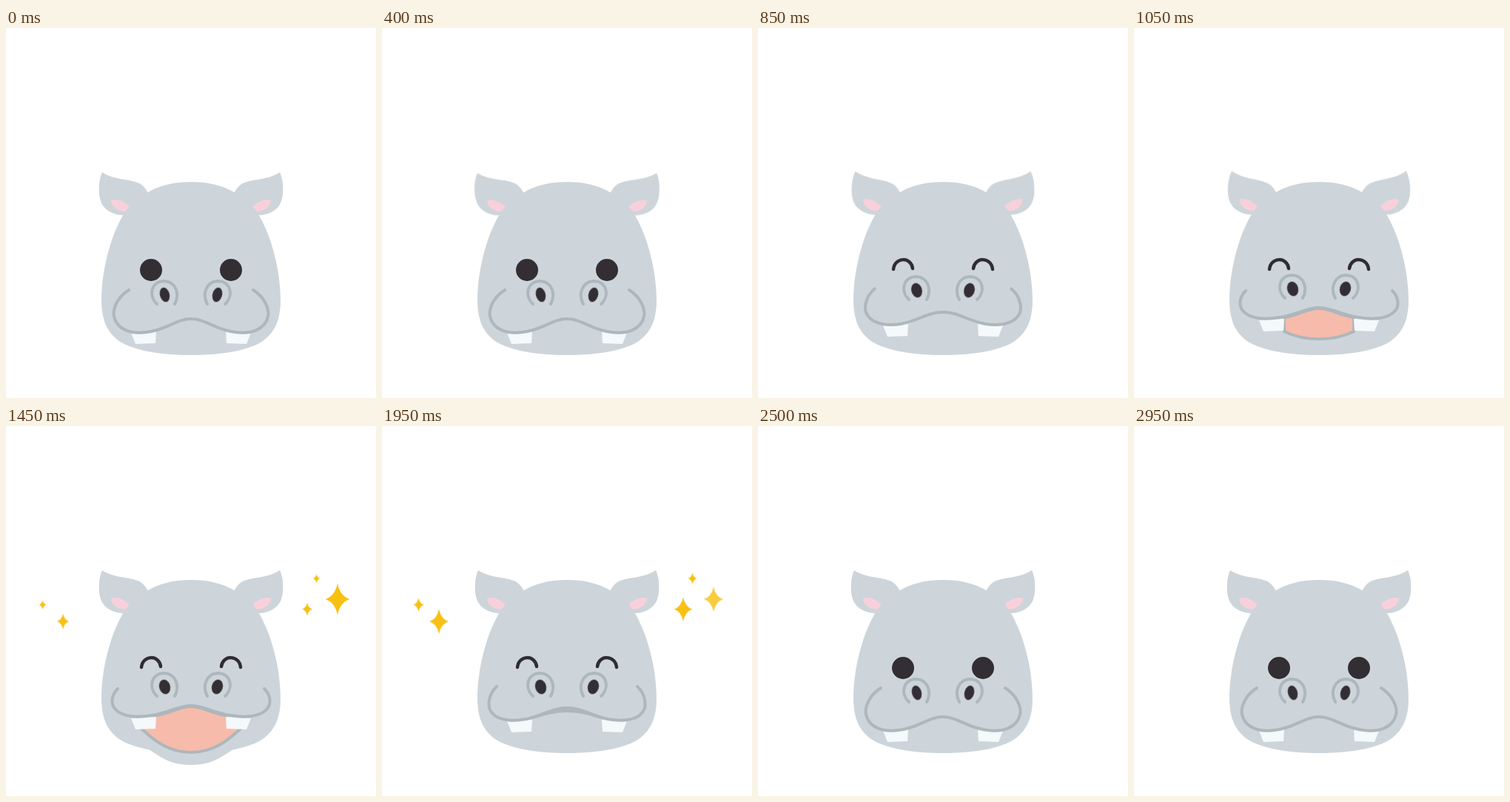
Write an HTML page that moves like this. It is 500 px wide and 500 px high and loops after 3 s.

```html
<!DOCTYPE html>
<html lang="en">
<head>
<meta charset="utf-8">
<title>Happy hippo</title>
<style>
html, body { margin: 0; width: 100%; height: 100%; overflow: hidden; background: #fff; }
svg { display: block; width: 100vw; height: 100vh; }
svg * { animation: 3s linear infinite; }

.skin { fill: #cdd5da; }
.line { fill: none; stroke: #adb7bc; stroke-width: 4; stroke-linecap: round; stroke-linejoin: round; }
.dark { fill: #322e33; }
.pink { fill: #f8d0dc; }
.tooth { fill: #f4f9fb; }
.smile { fill: none; stroke: #2f2c33; stroke-width: 4.5; stroke-linecap: round; }
.star { fill: #f8c013; }

.ear { transform-origin: 172px 245px; animation-name: flap; }
.chin { animation-name: chin; }
.mouth { fill: #f6bbab; stroke: #adb7bc; stroke-width: 4; stroke-linejoin: round; animation-name: mouth, mouth-show; }
.lip { animation-name: lip; }
.tooth { animation-name: tooth; }
.nose { animation-name: nose; }
.nostril { transform-origin: 214.5px 360.5px; animation-name: nostril; }
.eye { transform-origin: 196px 330px; animation-name: blink, eye-show; }
.smile { animation-name: smile-show; }
.star { transform: scale(0); animation-name: twinkle; }
.flare { animation-name: flare; }

@keyframes flap {
  0%, 70%, 80%, 100% { transform: none; }
  8% { transform: rotate(4deg); }
  18.333% { transform: rotate(-6deg); }
  20% { transform: rotate(-7.5deg); }
  21.667% { transform: rotate(-7deg); }
  30% { transform: rotate(4deg); }
  35% { transform: rotate(2.5deg); }
  40% { transform: none; }
  75% { transform: rotate(8deg); }
}
@keyframes blink {
  0%, 20% { transform: none; }
  21.667% { transform: scaleY(.83); }
  25%, 73.333% { transform: scaleY(.12); }
  76.667%, 100% { transform: none; }
}
@keyframes eye-show {
  0%, 24.99% { opacity: 1; }
  25%, 73.32% { opacity: 0; }
  73.333%, 100% { opacity: 1; }
}
@keyframes smile-show {
  0%, 24.99% { opacity: 0; }
  25%, 73.32% { opacity: 1; }
  73.333%, 100% { opacity: 0; }
}
@keyframes nose {
  0%, 23.333%, 78.333%, 100% { transform: none; }
  30%, 70% { transform: translateY(-8px); }
}
@keyframes nostril {
  0%, 23.333%, 78.333%, 100% { transform: none; }
  30%, 70% { transform: scaleX(1.15); }
}
@keyframes tooth {
  0%, 23.333%, 78.333%, 100% { transform: translateY(17px); }
  30%, 33.333%, 63.333%, 70% { transform: translateY(4px); }
  35%, 56.667% { transform: none; }
}
@keyframes chin {
  0%, 35%, 63.333%, 100% { transform: translateY(-17px); }
  36.667% { transform: translateY(-3px); }
  38.333%, 56.667% { transform: none; }
}
/* neutral, closed grin, open grin */
@keyframes lip {
  0%, 23.333%, 78.333%, 100% { d: path("M166 354C150 364 144 380 146 390C150 408 170 414 190 411C218 408 230 393 250 393C270 393 282 408 310 411C330 414 350 408 354 390C356 380 350 364 334 354"); }
  30%, 33.333%, 63.333%, 70% { d: path("M155 352C144 362 141 380 149 388C158 399 180 399 195 396C220 390 230 381 250 381C270 381 280 390 305 396C320 399 342 399 351 388C359 380 356 362 345 352"); }
  35%, 56.667% { d: path("M151 355C142 364 141 376 148 383C158 394 180 394 197 391C222 387 232 378 250 378C268 378 278 387 303 391C320 394 342 394 352 383C359 376 358 364 349 355"); }
}
@keyframes mouth {
  0%, 33.333%, 63.333%, 100% { d: path("M203 394C222 390 232 381 250 381C268 381 278 390 297 394L297 394C280 389 268 385 250 385C232 385 220 389 203 394Z"); }
  35% { d: path("M203 391C225 388 232 379 250 379C268 379 275 388 297 391L297 410C285 416 268 420 250 420C232 420 215 416 203 410Z"); }
  38.333%, 56.667% { d: path("M203 391C225 388 232 379 250 379C268 379 275 388 297 391L317 409C300 425 280 441 250 441C220 441 200 425 183 409Z"); }
}
@keyframes mouth-show {
  0%, 33.32% { opacity: 0; }
  33.333%, 70% { opacity: 1; }
  70.01%, 100% { opacity: 0; }
}
@keyframes twinkle {
  0%, 36.667% { transform: scale(0); opacity: 1; }
  41.667% { transform: scale(var(--peak)); }
  48.333% { transform: scale(var(--low)); }
  56.667% { transform: scale(var(--peak)); }
  65% { transform: scale(var(--late)); opacity: 1; }
  73.333%, 100% { transform: scale(0); opacity: .6; }
}
@keyframes flare {
  0%, 35% { transform: scale(0); opacity: 1; }
  36.667% { transform: scale(1.13); }
  42.667% { transform: scale(.65); }
  48.333% { transform: scale(1); }
  56.667% { transform: scale(1.13); opacity: 1; }
  65% { transform: scale(.8); opacity: .82; }
  73.333%, 100% { transform: scale(0); opacity: .5; }
}
</style>
</head>
<body>
<svg viewBox="0 0 500 500">
  <g class="half">
    <g class="ear">
      <path class="skin" d="M130 195C145 205 165 204 178 209C187 213 190 219 192 224L172 253H160C150 253 138 250 131 240C123 228 125 205 130 195Z"/>
      <path class="pink" d="M142 233C149 229 166 237 168 244C166 251 144 249 142 233Z"/>
    </g>
  </g>
  <path class="skin" d="M250 208C228 208 208 212 190 223C174 233 163 243 157 255C140 285 129 330 129 368C129 395 137 413 156 425C178 437 212 442 250 442C288 442 322 437 344 425C363 413 371 395 371 368C371 330 360 285 343 255C337 243 326 233 310 223C292 212 272 208 250 208Z"/>
  <path class="skin chin" d="M178 430C205 440 212 458 250 458C288 458 295 440 322 430Z"/>
  <path class="mouth"/>
  <g class="half">
    <path class="tooth" d="M169 395L203 393L202 409L175 410Z"/>
    <g class="nose">
      <path class="line" d="M204 373C192 362 196 342 214 342C230 343 235 360 228 373"/>
      <g transform="rotate(-15 214.5 360.5)"><ellipse class="dark nostril" cx="214.5" cy="360.5" rx="6.5" ry="10"/></g>
    </g>
    <circle class="dark eye" cx="196" cy="327" r="15"/>
    <path class="smile" d="M183 326C185 309 207 309 209 325"/>
  </g>
  <path class="line lip"/>
  <g id="stars"></g>
</svg>
<script>
const NS = "http://www.w3.org/2000/svg";

function add(parent, tag, attrs) {
  const el = document.createElementNS(NS, tag);
  for (const key in attrs) el.setAttribute(key, attrs[key]);
  parent.append(el);
  return el;
}

// Mirror each left half around the middle of the face.
for (const half of document.querySelectorAll(".half")) {
  const twin = half.cloneNode(true);
  twin.setAttribute("transform", "translate(500 0) scale(-1 1)");
  half.after(twin);
}

const shape = "M0-21.5Q3.5-4 16.5 0Q3.5 4 0 21.5Q-3.5 4-16.5 0Q-3.5-4 0-21.5Z";
const stars = document.getElementById("stars");
// x, y, peak, low and late scale
[
  [448, 234],
  [407, 247.5, .8, .42, .76],
  [419.5, 206, .5, .29, .36],
  [77, 264, .85, .49, .79],
  [49.5, 241.5, .6, .3, .43]
].forEach(([x, y, peak, low, late]) => {
  const spot = add(stars, "g", { transform: `translate(${x} ${y})` });
  add(spot, "path", {
    d: shape,
    class: peak ? "star" : "star flare",
    style: peak ? `--peak:${peak};--low:${low};--late:${late}` : ""
  });
});
</script>
</body>
</html>
```
